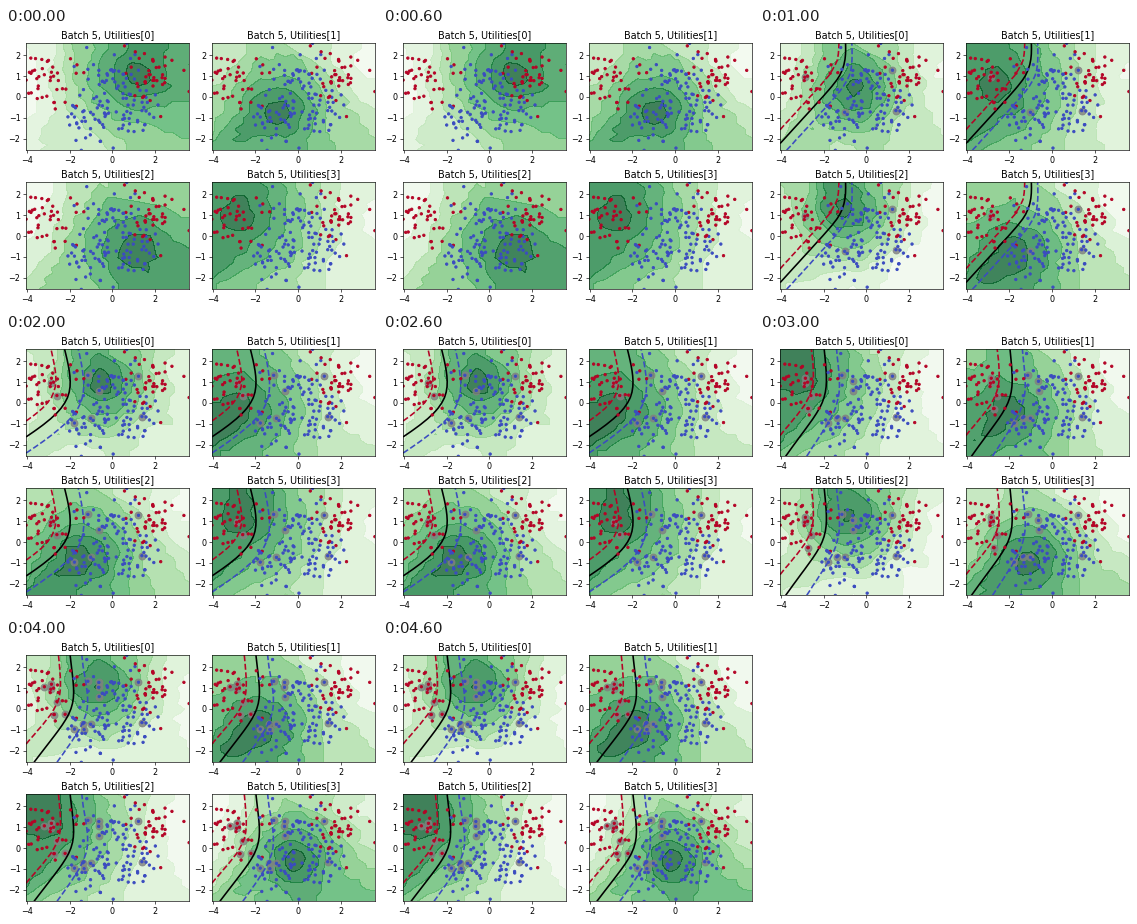
Animation, 371 px wide and 278 px high, one loop 5000 ms. Source, as a matplotlib script:

```python
import matplotlib.pyplot as plt
import numpy as np
from matplotlib.animation import FuncAnimation

W, H, DPI = 371, 278, 64
S = 58 / DPI  # point sizes below are meant for 58 dpi
GAMMA = 0.5
RES = 21

plt.rcParams.update({
    "font.family": "DejaVu Sans",
    "font.size": 10 * S,
    "axes.linewidth": 0.8 * S,
    "axes.titlepad": 6 * S,
    "lines.linewidth": 1.5 * S,
})
for axis in ("xtick", "ytick"):
    plt.rcParams.update({
        f"{axis}.major.size": 3.5 * S,
        f"{axis}.major.width": 0.8 * S,
        f"{axis}.major.pad": 3.5 * S,
    })


def make_blobs():
    rng = np.random.RandomState(0)
    centers = [(0, 1), (-3, 0.5), (-1, -1), (2, 1), (1, -0.5)]
    points = np.vstack([rng.normal(c, 0.7, (40, 2)) for c in centers])
    classes = np.repeat(np.arange(5), 40) % 2
    order = np.arange(200)
    rng.shuffle(order)
    return points[order], classes[order]


def sq_dist(a, b):
    return ((a[:, None] - b[None]) ** 2).sum(axis=2)


def kmeans(points, centers, steps=30):
    for _ in range(steps):
        nearest = sq_dist(points, np.array(centers)).argmin(axis=1)
        centers = [points[nearest == k].mean(axis=0)
                   for k in range(len(centers))]
    return centers


def predict(points, labeled):
    """Parzen window probability of the red class."""
    if not labeled:
        return np.full(len(points), 0.5)
    kernel = np.exp(-GAMMA * sq_dist(points, X[labeled]))
    return kernel @ Y[labeled] / kernel.sum(axis=1)


def run_cycles():
    labeled, cycles = [], []
    for centers in CENTERS:
        cand = np.setdiff1d(np.arange(len(X)), labeled)
        dist = np.sqrt(sq_dist(X[cand], np.array(centers)))
        near = np.argsort(sq_dist(MESH, X[cand]), axis=1)[:, :5]
        fields = [-dist[near, k].mean(axis=1).reshape(RES, RES)
                  for k in range(4)]
        prob = predict(MESH, labeled).reshape(RES, RES)
        cycles.append((fields, prob, list(labeled)))

        taken = []
        for k in range(4):
            order = cand[np.argsort(dist[:, k])]
            taken.append(next(int(i) for i in order if i not in taken))
        labeled += taken
    return cycles


X, Y = make_blobs()
LOW, HIGH = X.min(axis=0), X.max(axis=0)
GX, GY = np.meshgrid(np.linspace(LOW[0], HIGH[0], RES),
                     np.linspace(LOW[1], HIGH[1], RES))
MESH = np.column_stack([GX.ravel(), GY.ravel()])

# Peaks of the four utilities in each batch
CENTERS = [
    kmeans(X, [(1.25, 1.25), (-1.0, -0.8), (1.1, -0.65), (-3.0, 1.0)]),
    [(-0.55, 0.35), (-2.7, 0.55), (-1.0, 1.35), (-1.9, -0.95)],
    [(-0.5, 0.95), (-2.9, -0.2), (-1.5, -0.85), (-2.8, 1.2)],
    [(-3.2, 1.2), (-2.2, -0.4), (-0.8, 1.3), (-1.1, -0.95)],
    [(-0.7, 1.15), (-2.0, -0.95), (-3.2, 1.25), (-0.1, -0.6)],
]
CYCLES = run_cycles()

fig = plt.figure(figsize=(W / DPI, H / DPI), dpi=DPI, facecolor="white")
AX_W, AX_H = 163, 107
axes = [fig.add_axes([x / W, 1 - (y + AX_H) / H, AX_W / W, AX_H / H])
        for y in (15.3, 154.4) for x in (20.1, 205.9)]


def draw_panel(ax, k, field, prob, labeled):
    ax.clear()
    ax.contourf(GX, GY, field, cmap="Greens", alpha=0.75)
    if labeled:
        ax.scatter(*X[labeled].T, c="grey", alpha=0.8, marker=".",
                   s=300 * S ** 2, zorder=1)
        ax.contour(GX, GY, prob, levels=[0.5], colors="k",
                   linewidths=2 * S, zorder=1.5)
        ax.contour(GX, GY, prob, levels=[0.25, 0.75], cmap="coolwarm",
                   linewidths=2 * S, linestyles="--", zorder=1.5)
    ax.scatter(*X.T, c=Y, cmap="coolwarm", marker=".", s=36 * S ** 2, zorder=2)
    ax.set(xlim=(LOW[0], HIGH[0]), ylim=(LOW[1], HIGH[1]),
           xticks=[-4, -2, 0, 2], yticks=[-2, -1, 0, 1, 2])
    ax.set_title(f"Batch 5, Utilities[{k}]")


def update(i):
    fields, prob, labeled = CYCLES[i]
    for k, ax in enumerate(axes):
        draw_panel(ax, k, fields[k], prob, labeled)
    return []


anim = FuncAnimation(fig, update, frames=len(CYCLES), interval=1000,
                     repeat=True, repeat_delay=0)
plt.show()
```
